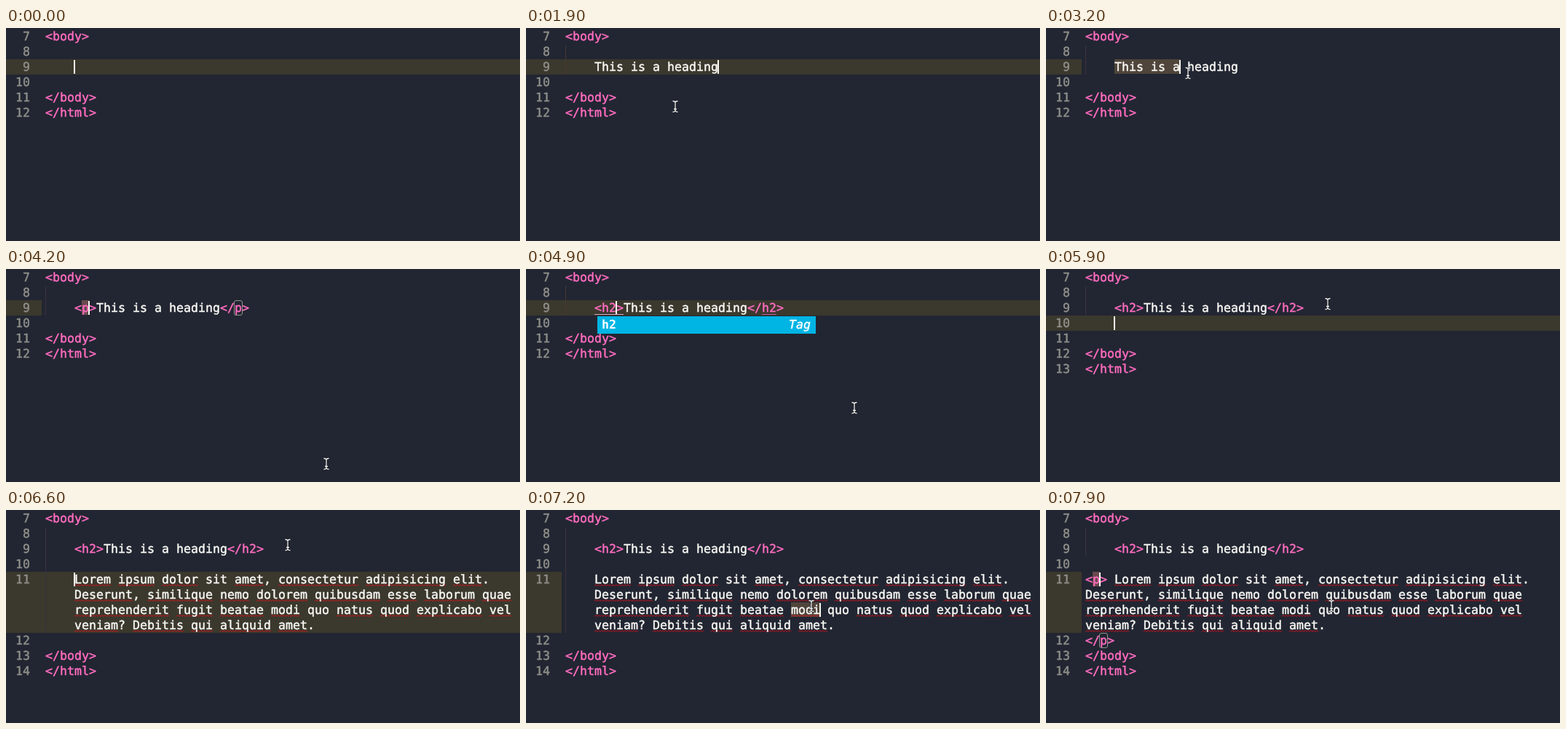
An HTML page for the animation above (8 s loop, 706 px wide and 293 px high).

```html
<!DOCTYPE html>
<html lang="en">
<head>
<meta charset="utf-8">
<title>Editor typing demo</title>
<style>
  html, body { margin: 0; width: 100%; height: 100%; overflow: hidden; background: #222632; }
  svg { display: block; }
  text {
    --ink: #f8f8f4;
    font: 16.61px "DejaVu Sans Mono", "Liberation Mono", monospace;
    text-rendering: geometricPrecision;
    fill: var(--ink);
    stroke: var(--ink);
    stroke-width: 0.45px;
  }
  .tag { --ink: #ff6cc0; }
  .num { --ink: #8f908a; text-anchor: end; }
  .bold { --ink: #fff; font-weight: bold; stroke: none; }
  .hint { --ink: #fff; font-style: italic; text-anchor: end; }
</style>
</head>
<body>
<svg id="stage" width="706" height="293" viewBox="0 0 706 293"></svg>
<script>
const LOOP = 8000, STEP = 100;
const LEFT = 54, CHAR = 10, ROW = 21, BASELINE = 16, GUTTER = 49, WIDTH = 706;
const HEADING = 'This is a heading';
const PARAGRAPH = [
  'Lorem ipsum dolor sit amet, consectetur adipisicing elit.',
  'Deserunt, similique nemo dolorem quibusdam esse laborum quae',
  'reprehenderit fugit beatae modi quo natus quod explicabo vel',
  'veniam? Debitis qui aliquid amet.'
];
const KNOWN_WORDS = ['sit', 'quo'];
const COLOR = { line: '#3b382d', sel: '#50453b', field: '#6a4a4e', guide: '#48392f', dimGuide: '#3a3140' };

// Pointer path: step, x, y
const POINTER = [
  [18, 231, 186], [19, 205, 108], [21, 150, 62], [24, 108, 39], [27, 96, 52],
  [28, 97, 57], [29, 103, 59], [30, 126, 60], [31, 162, 61], [32, 195, 62],
  [33, 226, 63], [34, 252, 63], [35, 272, 63], [36, 278, 62],
  [39, 380, 180], [42, 440, 268], [45, 449, 265], [49, 451, 191],
  [51, 404, 92], [53, 387, 48], [66, 387, 48], [68, 389, 76], [70, 392, 132], [80, 392, 132]
];

const stage = document.getElementById('stage');
const colX = col => LEFT + col * CHAR;
const rowY = row => 1 + row * ROW;
const rect = (x, y, w, h, fill, extra = '') =>
  `<rect x="${x}" y="${y}" width="${w}" height="${h}" fill="${fill}" ${extra}/>`;
const label = (x, y, str, cls = '') =>
  `<text x="${x}" y="${y}" class="${cls}">${str.replace(/</g, '&lt;').replace(/>/g, '&gt;')}</text>`;

function pointerAt(n) {
  const i = POINTER.findIndex(p => p[0] >= n);
  const b = POINTER[i], a = POINTER[Math.max(0, i - 1)];
  const k = b[0] === a[0] ? 0 : (n - a[0]) / (b[0] - a[0]);
  return [a[1] + (b[1] - a[1]) * k, a[2] + (b[2] - a[2]) * k];
}

const tagName = n => n < 45 ? 'p' : n < 47 ? 'h' : 'h2';
const dragged = n => Math.max(0, Math.min(HEADING.length, Math.floor((pointerAt(n)[0] - 99) / CHAR)));

// Each logical line is a list of the visual rows it wraps into.
function linesAt(n) {
  const tag = tagName(n);
  const heading = n < 41 ? HEADING.slice(0, n) : `<${tag}>${HEADING}</${tag}>`;
  const lines = [['<body>'], [''], ['    ' + heading], ['']];
  if (n >= 54) lines.push(['']);
  if (n >= 60) {
    let rows = ['    ' + 'lorem'.slice(0, n - 60)];
    if (n >= 66) rows = PARAGRAPH.map(s => '    ' + s);
    if (n >= 77) rows = PARAGRAPH.map((s, i) => i ? s : '<p> ' + s);
    lines[4] = rows;
    lines.push([n >= 77 ? '</p>' : '']);
  }
  return lines.concat([['</body>'], ['</html>']]);
}

// caret: [col, row]; active: [first row, row count]; sel: [row, from, to]; box: [row, col]
function editAt(n) {
  if (n < 28) return { caret: [4 + Math.min(n, 17), 2], active: [2, 1], sel: [] };
  if (n < 41) {
    const k = dragged(n);
    return { caret: [4 + k, 2], active: [2, 1], sel: k ? [[2, 4, 4 + k]] : [] };
  }
  if (n < 45) return { caret: [6, 2], active: [2, 1], sel: [[2, 5, 6]], box: [2, 26] };
  if (n < 52) return { caret: [5 + tagName(n).length, 2], active: [2, 1], sel: [], popup: true };
  if (n < 54) return { caret: [30, 2], active: [2, 1], sel: [] };
  if (n < 60) return { caret: [4, 3], active: [3, 1], sel: [] };
  if (n < 66) return { caret: [4 + n - 60, 4], active: [4, 1], sel: [] };
  if (n < 71) return { caret: [4, 4], active: [4, 4], sel: [] };
  if (n < 72) return { caret: [34, 6], active: [4, 4], sel: [] };
  if (n < 73) return { caret: [35, 6], active: [4, 4], sel: [[6, 31, 35]] };
  if (n < 77) return { caret: [0, 8], active: [8, 1], sel: [4, 5, 6, 7].map(r => [r, 0, 65]) };
  return { caret: [2, 4], active: [4, 4], sel: [[4, 1, 2]], box: [8, 2] };
}

function squiggle(x, y, w) {
  let d = `M${x} ${y + 1}`;
  for (let i = 2; i <= w; i += 2) d += `L${x + i} ${y + (i % 4 ? -1 : 1)}`;
  return `<path d="${d}" fill="none" stroke="#e8101a" stroke-width="0.9"/>`;
}

function textRow(str, row, spell) {
  let out = '';
  for (const m of str.matchAll(/<\/?\w+>|[^<\s]+/g)) {
    const word = m[0], isTag = word[0] === '<', x = colX(m.index);
    const bare = word.replace(/\W/g, '');
    if (spell && !isTag && !KNOWN_WORDS.includes(bare)) {
      out += squiggle(x, rowY(row) + 18.5, bare.length * CHAR);
    }
    out += label(x, rowY(row) + BASELINE, word, isTag ? 'tag' : '');
  }
  return out;
}

function guide(n, selecting) {
  if (n < 1) return '';
  const rows = n > 60 && n < 77 ? 8 : 3;
  const dim = selecting || n >= 54;
  return rect(LEFT, 24, 1, rowY(rows) - 24, dim ? COLOR.dimGuide : COLOR.guide);
}

function popup(n) {
  const tag = tagName(n), y = rowY(3) - 2, end = 4 + 2 + tag.length + HEADING.length;
  return rect(colX(4), y, (tag.length + 2) * CHAR, 1, '#d9a6c4') +
    rect(colX(end + 2), y, tag.length * CHAR, 1, '#c95d9c') +
    rect(98, 65, 300, 24, '#00b4e4') +
    label(104, 82, tag, 'bold') + label(391, 82, 'Tag', 'hint');
}

function pointer(n) {
  const [x, y] = pointerAt(n).map(Math.round);
  const d = `M${x - 3.5} ${y - 7.5}Q${x} ${y - 7.5} ${x} ${y - 5}V${y + 5}Q${x} ${y + 7.5} ${x - 3.5} ${y + 7.5}` +
    `M${x + 3.5} ${y - 7.5}Q${x} ${y - 7.5} ${x} ${y - 5}M${x} ${y + 5}Q${x} ${y + 7.5} ${x + 3.5} ${y + 7.5}` +
    `M${x - 2} ${y + 3.5}H${x + 2}`;
  const stroke = (c, w) => `<path d="${d}" fill="none" stroke="${c}" stroke-width="${w}"/>`;
  return stroke('#15171d', 2.6) + stroke('#f2f2f2', 1.3);
}

function draw(n) {
  const edit = editAt(n), selecting = edit.sel.length > 0;
  const [first, count] = edit.active;
  let out = rect(0, 0, WIDTH, 293, '#222632');
  out += rect(0, rowY(first), selecting ? GUTTER : WIDTH, count * ROW, COLOR.line);
  for (const [row, from, to] of edit.sel) {
    out += rect(colX(from), rowY(row), (to - from) * CHAR, ROW - 1, edit.box ? COLOR.field : COLOR.sel);
  }
  out += guide(n, selecting);

  let row = 0;
  linesAt(n).forEach((rows, i) => {
    out += label(33, rowY(row) + BASELINE, String(7 + i), 'num');
    for (const str of rows) out += textRow(str, row++, rows.length > 1);
  });

  if (edit.box) {
    const [r, c] = edit.box;
    out += rect(colX(c) - 0.5, rowY(r) + 0.5, CHAR + 1, ROW - 1, 'none', 'rx="2.5" stroke="#94948f"');
  }
  const [col, line] = edit.caret;
  out += rect(colX(col) - 1, rowY(line) + 1, 2, ROW - 2, '#f8f8f0');
  if (edit.popup) out += popup(n);
  if (n >= 18) out += pointer(n);
  stage.innerHTML = out;
}

let shown = -1;
const start = performance.now();
function tick() {
  const n = Math.floor(((performance.now() - start) % LOOP) / STEP);
  if (n !== shown) draw(shown = n);
  requestAnimationFrame(tick);
}
tick();
</script>
</body>
</html>
```
